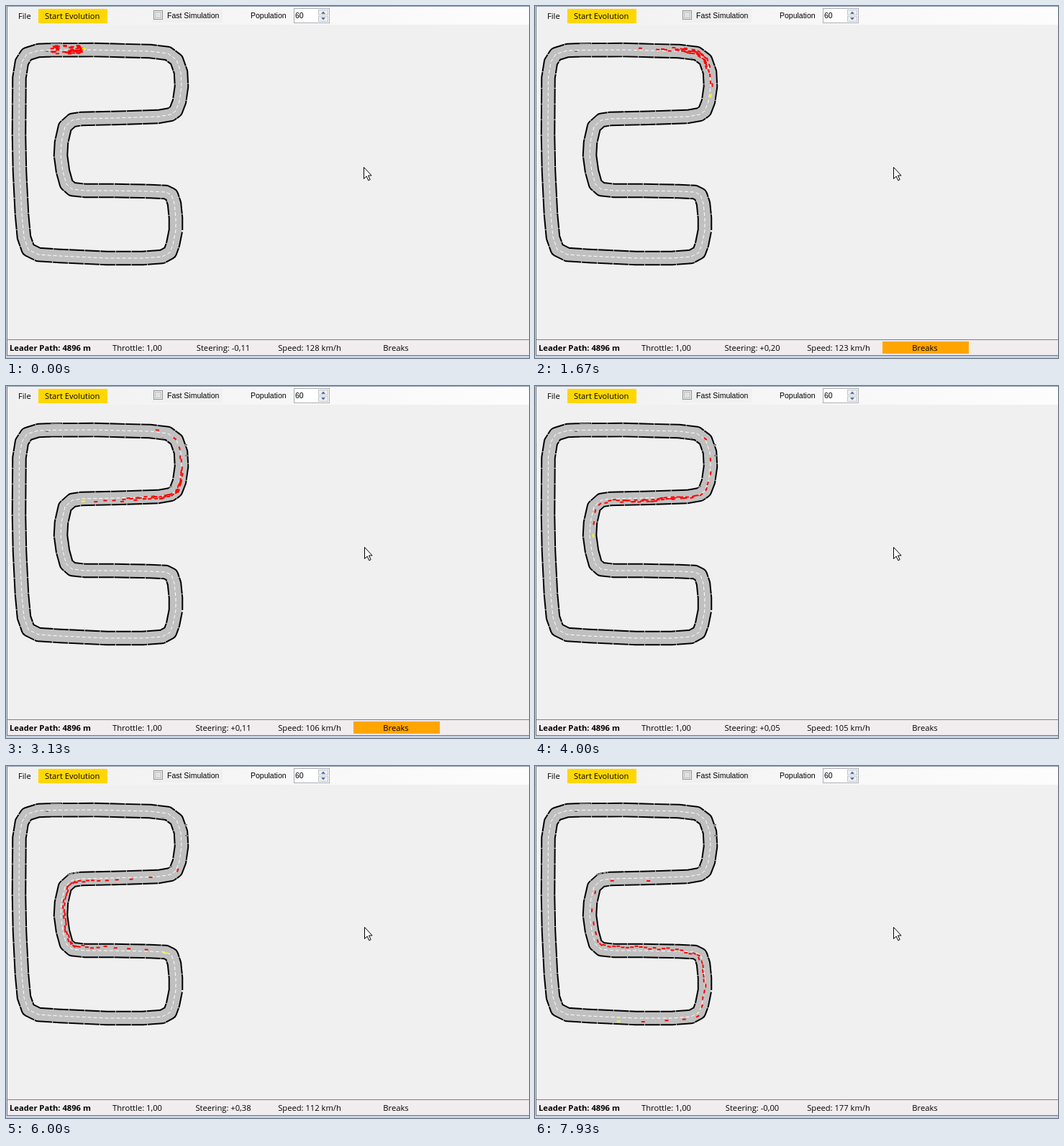
These frames come from a looping animation (727 px wide and 490 px high, 8 s). An HTML page with a canvas:

```html
<!DOCTYPE html>
<html lang="en">
<head>
<meta charset="utf-8">
<title>Evolving racers</title>
<style>
  html, body { margin: 0; width: 100%; height: 100%; overflow: hidden; background: #f0f0f0; }
  canvas { display: block; }
</style>
</head>
<body>
<canvas id="stage" width="727" height="490"></canvas>
<script>
const ctx = document.getElementById('stage').getContext('2d');
const LOOP = 8000, STEPS = 120, STEPS_PER_MS = 0.015;
const UI_FONT = '11.2px "Open Sans", sans-serif';
const LABEL_FONT = '10.5px "Liberation Sans", sans-serif';

// Centre line of the track, in driving order from the start.
const track = [
  [57, 61.5], [120, 61], [200, 63], [225, 66], [237, 75], [243, 92], [244, 112], [241, 133],
  [236, 146], [229, 151], [212, 154], [150, 156], [105, 157], [92, 159], [82, 168], [77, 190],
  [76, 208], [79, 230], [84, 248], [92, 255], [110, 257], [150, 257], [200, 258], [222, 259],
  [230, 263], [234, 275], [236, 295], [236, 312], [232, 332], [228, 343], [217, 349], [190, 351],
  [140, 351], [75, 348], [45, 346], [31, 339], [25, 322], [22, 290], [19, 230], [18, 180],
  [18.5, 100], [22, 78], [29, 67], [45, 62]
];
const trackPath = new Path2D('M' + track.join('L') + 'Z');

// Leader: step, distance in px, speed in km/h, steering.
const leaderKeys = [
  [0, 51, 128, -0.11], [25, 234, 123, 0.20], [47, 387, 106, 0.11], [73, 524, 94, -0.02],
  [90, 637, 112, 0.38], [105, 735, 124, 0.24], [119, 842, 177, 0]
];
const PX_PER_STEP = 0.0511; // covered at 1 km/h

// Preferred offset to the left of the centre line, by distance.
const racingLine = [
  [0, 0], [140, 3], [190, 0], [240, 2], [300, 1], [340, 4], [400, 3], [460, 4.5],
  [530, 5.5], [600, 3], [645, -3], [690, 0], [740, 3], [850, 5]
];
const brakeSpans = [[12, 15], [21, 26], [41, 51], [54, 58], [69, 72], [84, 88], [96, 100]];

// Crashes: step, distance, wreck position.
const crashes = [
  [21, 160, 217, 73], [27, 192, 250, 82], [29, 207, 251, 97], [42, 265, 229, 140],
  [67, 402, 87, 151], [80, 400, 91, 150], [84, 396, 97, 149]
];

const hash = n => { const x = Math.sin(n * 127.1 + 3) * 43758.5; return x - Math.floor(x); };

function segment(keys, x) {
  let i = 0;
  while (i < keys.length - 2 && x >= keys[i + 1][0]) i++;
  const a = keys[i], b = keys[i + 1];
  return { a, b, u: (x - a[0]) / (b[0] - a[0]) };
}

function leaderAt(step) {
  const { a, b, u } = segment(leaderKeys, step);
  const span = b[0] - a[0], d = b[1] - a[1];
  const m0 = a[2] * PX_PER_STEP * span, m1 = b[2] * PX_PER_STEP * span;
  const c2 = 3 * d - 2 * m0 - m1, c3 = m0 + m1 - 2 * d;
  return {
    distance: a[1] + u * (m0 + u * (c2 + u * c3)),
    speed: (m0 + u * (2 * c2 + u * 3 * c3)) / span / PX_PER_STEP,
    steering: a[3] + (b[3] - a[3]) * u + 0.15 * Math.sin(2 * Math.PI * u)
  };
}

let travelled = 0;
const milestones = track.map((p, i) => {
  if (i) travelled += Math.hypot(p[0] - track[i - 1][0], p[1] - track[i - 1][1]);
  return [travelled, p[0], p[1]];
});

function drawCar(distance, lane, color) {
  const { a, b, u } = segment(milestones, distance);
  const line = segment(racingLine, distance);
  const offset = lane + line.a[1] + (line.b[1] - line.a[1]) * line.u;
  ctx.save();
  ctx.translate(a[1] + (b[1] - a[1]) * u, a[2] + (b[2] - a[2]) * u);
  ctx.rotate(Math.atan2(b[2] - a[2], b[1] - a[1]));
  fill(color, -2.5, -offset - 1, 5, 2);
  ctx.restore();
}

// Each car keeps a share of the leader's distance once the start has settled.
const PACK = 44;
const cars = [];
for (let i = 0; i < PACK + crashes.length; i++) {
  const crash = crashes[i - PACK];
  const v = 2 * i / (PACK - 1) - 1;
  cars.push({
    share: crash ? crash[1] / leaderAt(crash[0]).distance
                 : 0.71 + 0.16 * v + (v < 0 ? 0.15 : 0.09) * v ** 9,
    start: i % 4 ? 22 + 27 * hash(i) : 5 + 11 * hash(i),
    lane: hash(i + 100) * 2 - 1,
    end: crash ? crash[0] : STEPS
  });
}

function fill(color, x, y, w, h) {
  ctx.fillStyle = color;
  ctx.fillRect(x, y, w, h);
}

function box(fillColor, border, x, y, w, h) {
  fill(border, x, y, w, h);
  fill(fillColor, x + 1, y + 1, w - 2, h - 2);
}

function text(string, x, y, font = UI_FONT, align = 'left') {
  ctx.font = font;
  ctx.textAlign = align;
  ctx.fillStyle = '#000';
  ctx.fillText(string, x, y);
}

function polygon(points, color) {
  ctx.fillStyle = color;
  ctx.fill(new Path2D('M' + points + 'Z'));
}

function strokeTrack(color, width, dash) {
  ctx.strokeStyle = color;
  ctx.lineWidth = width;
  ctx.setLineDash(dash);
  ctx.stroke(trackPath);
  ctx.setLineDash([]);
}

function drawToolbar() {
  const shine = ctx.createLinearGradient(0, 0, 727, 0);
  shine.addColorStop(0, '#f0f0f0');
  shine.addColorStop(1, '#fdfdfd');
  fill(shine, 2, 1, 725, 25);
  fill('#f0f0f0', 203, 4, 98, 19);
  fill('#ffd700', 45, 4, 96, 20);
  text('File', 17, 18);
  text('Start Evolution', 54, 18);
  box('#f4f4f4', '#8e8f8f', 205, 6, 13, 13);
  box('#dfe2e5', '#b8bcc0', 207, 8, 9, 9);
  text('Fast Simulation', 224, 17, LABEL_FONT);
  text('Population', 340, 17, LABEL_FONT);
  box('#fff', '#abadb3', 400, 3, 50, 21);
  text('60', 402, 17, LABEL_FONT);
  box('#eeeff1', '#c3c7cc', 434, 5, 14, 8);
  box('#eeeff1', '#c3c7cc', 434, 14, 14, 8);
  polygon('438,11 441,7.5 444,11', '#4a6fb0');
  polygon('438,16 441,19.5 444,16', '#4a6fb0');
}

function drawTrack() {
  ctx.lineJoin = 'round';
  strokeTrack('#000', 20.5, [21, 0.8]);
  strokeTrack('#c0c0c0', 16.5, []);
  strokeTrack('#fff', 1, [5, 3]);
  fill('#909090', 62, 52, 15, 1);
  fill('#909090', 62, 71, 15, 1);
  fill('#808080', 55, 62, 4, 2);
}

function drawCars(step, leader) {
  for (const [when, , x, y] of crashes) {
    if (step >= when) fill('#808080', x - 2, y - 1, 4, 2);
  }
  const settling = Math.exp(-step / 22);
  for (const car of cars) {
    if (step >= car.end) continue;
    const distance = car.share * leader.distance + (car.start - car.share * 51) * settling;
    drawCar(distance, car.lane * (1.6 + 4.4 * settling), '#f00');
  }
  drawCar(leader.distance, 0.5, '#ff0');
}

function drawStatus(step, leader) {
  fill('#f1eced', 2, 465, 725, 21);
  fill('#808080', 2, 464, 725, 1);
  if (brakeSpans.some(([from, to]) => step >= from && step < to)) fill('#ffa500', 483, 467, 120, 17);
  const steering = (leader.steering < 0 ? '-' : '+') + Math.abs(leader.steering).toFixed(2).replace('.', ',');
  const speed = String(Math.round(leader.speed)).padStart(3, '0');
  text('Leader Path: 4896 m', 5, 480, 'bold ' + UI_FONT);
  text('Throttle: 1,00', 182.5, 480, UI_FONT, 'center');
  text('Steering: ' + steering, 302, 480, UI_FONT, 'center');
  text('Speed: ' + speed + ' km/h', 422, 480, UI_FONT, 'center');
  text('Breaks', 542, 480, UI_FONT, 'center');
}

function drawWindowEdge() {
  fill('#d5dfeb', 0, 0, 1, 490);
  fill('#66788f', 1, 0, 1, 487);
  fill('#8b9bb0', 1, 0, 726, 1);
  fill('#66788f', 1, 486, 726, 1);
  fill('#c5d3e3', 0, 487, 727, 3);
}

function drawPointer(x, y) {
  ctx.save();
  ctx.translate(x, y);
  const arrow = new Path2D('M0,.5V16.5L3.6,13L6.3,18.8L8.7,17.7L6,12H10.6Z');
  ctx.fillStyle = '#fff';
  ctx.fill(arrow);
  ctx.strokeStyle = '#000';
  ctx.lineWidth = 1;
  ctx.stroke(arrow);
  ctx.restore();
}

function draw(now) {
  const step = Math.min(STEPS - 1, Math.floor((now % LOOP + 4) * STEPS_PER_MS));
  const leader = leaderAt(step);
  fill('#f0f0f0', 0, 0, 727, 490);
  drawToolbar();
  drawTrack();
  drawCars(step, leader);
  drawStatus(step, leader);
  drawWindowEdge();
  drawPointer(step < 5 ? 497.5 : 498.5, 224);
}

const began = performance.now();
function tick() {
  draw(performance.now() - began);
  requestAnimationFrame(tick);
}
tick();
</script>
</body>
</html>
```
